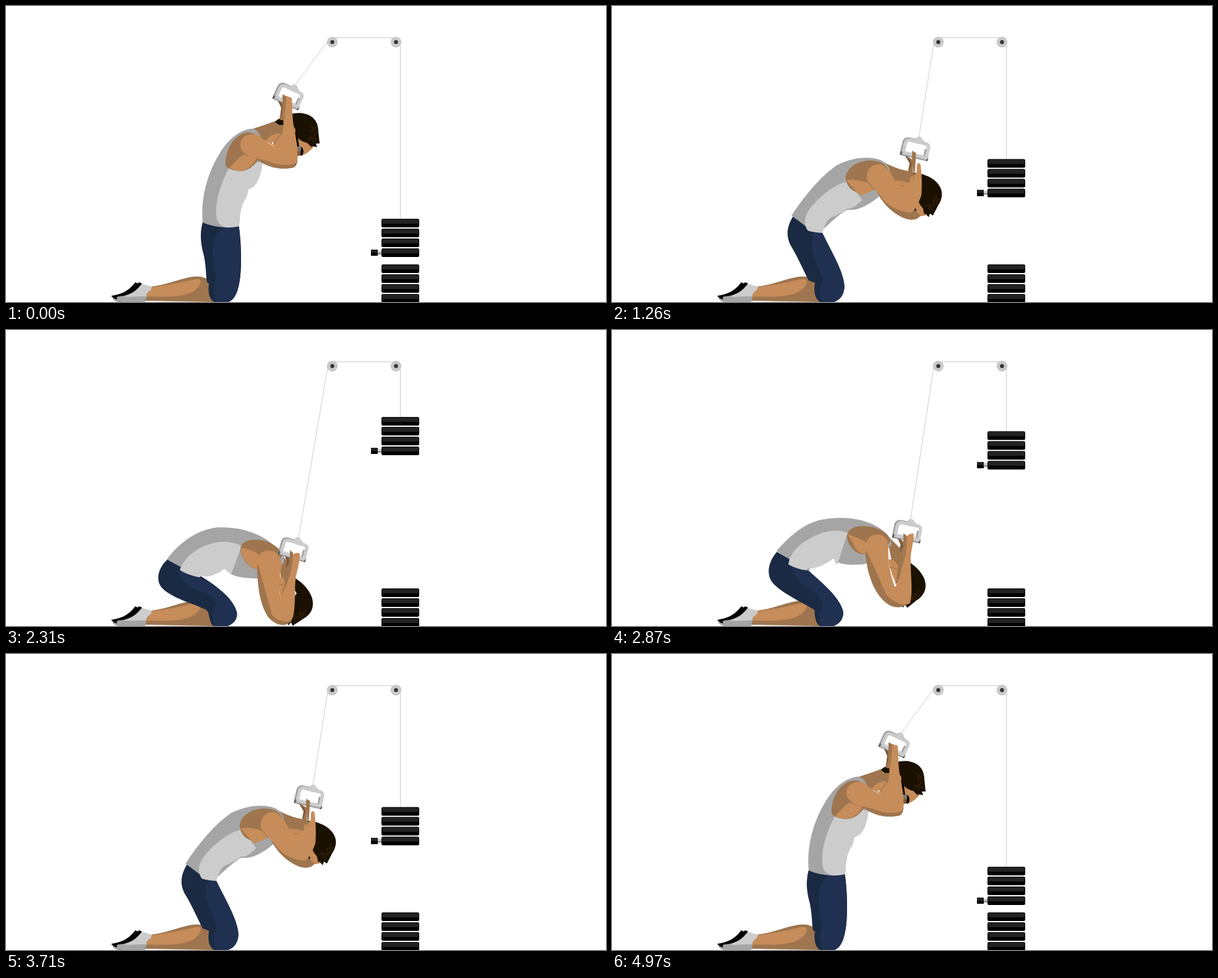
Recreate the animation shown at these times as an HTML page. Size 970 by 480 pixels, loop 5.04 s.

```html
<!DOCTYPE html>
<html lang="en">
<head>
<meta charset="utf-8">
<title>Kneeling cable crunch</title>
<style>
html, body { margin: 0; width: 100%; height: 100%; overflow: hidden; background: #fff; }
svg { display: block; width: 970px; height: 480px; }
.skin { fill: #c68c59; }
.shade { fill: #9e754e; }
.deep { fill: #7d5b3b; }
.grey { fill: #ccc; }
.steel { fill: #a5a5a5; }
.navy { fill: #1a2a42; }
.blue { fill: #203050; }
.hair { fill: #1a1100; }
.line { fill: none; stroke: #ccc; }
.fold { fill: none; stroke: #9e754e; stroke-width: 1.5; }
</style>
</head>
<body>
<svg viewBox="0 0 970 480">
  <defs>
    <g id="plate">
      <rect x="607" width="61" height="14" rx="2.5"/>
      <rect x="607.5" y=".5" width="60" height="7.5" rx="2.5" fill="#222"/>
    </g>
    <g id="stack">
      <use href="#plate"/><use href="#plate" y="16"/><use href="#plate" y="32"/><use href="#plate" y="48"/>
    </g>
    <g id="pulley">
      <circle r="8.7" fill="#c9c9c9"/><circle r="3.2" fill="#333"/>
    </g>
  </defs>

  <path class="line" d="M527 51.5H631Q637.5 51.5 637.5 60"/>
  <path id="rope" class="line"/>
  <path id="cable" class="line"/>
  <use href="#pulley" x="527.5" y="58.5"/>
  <use href="#pulley" x="630.5" y="58.5"/>
  <use href="#stack" y="419"/>
  <g id="load">
    <use href="#stack"/>
    <rect x="601" y="52" width="6" height="6" fill="#999"/>
    <rect x="601" y="52" width="6" height="3" fill="#ccc"/>
    <rect x="590" y="50" width="11" height="10"/>
    <rect x="590" y="50" width="11" height="5" fill="#222"/>
  </g>

  <path class="shade" d="M235 455C260 452 285 441 302 439C315 437 324 441 329 446L335 480L224 478Z"/>
  <path class="skin" d="M235 456C260 454 290 446 307 443C318 441 316 450 310 457C298 470 275 473 224 471Z"/>
  <path class="steel" d="M172 474C185 470 210 462 228 466L225 480H181Q174 478 172 474Z"/>
  <path class="grey" d="M217 450L236 455L234 461L228 465L226 471C212 470 205 473 191 471C203 466 212 458 217 450Z"/>
  <path d="M170 470C185 468 198 463 209 448L213 450L215 448L220 450C211 462 200 470 182 471Q177 472 180 476L174 474Z"/>

  <path id="pants" class="navy"/>
  <path id="thigh" class="blue"/>
  <g id="head">
    <path class="skin" d="M468 200L498 222L497 229C492 235 485 240 478 243H468Z"/>
    <path d="M465 190L472 214L474 229L477 228C482 232 482 239 478 243L476 241L471 243L469 220Z"/>
    <path fill="#777" d="M471 228H477V236H471Z"/>
    <path class="deep" d="M472 235L477 234L476 241L472 242Z"/>
    <path class="hair" d="M434 188C447 178 464 172 480 174C497 177 505 188 505 204L507 223L501 223L503 229L494 227L495 230L487 222C479 220 474 217 471 212L464 193H441Z"/>
    <path fill="none" stroke="#3a2008" stroke-width="1.5" d="M493 192L497 198L494 203L500 208L496 214L503 217M502 194L499 201L504 206M488 218L493 212L496 220"/>
    <ellipse class="skin" cx="462" cy="202" rx="6" ry="7"/>
  </g>
  <path id="neck" class="shade"/>
  <path id="shirt" class="steel"/>
  <path id="front" class="grey"/>
  <path id="armhole" class="shade"/>
  <path id="side" class="skin"/>
  <path id="collar" class="skin"/>
  <path id="crease" class="fold"/>
  <path id="glint" fill="#fff"/>
  <path id="farArm" class="shade"/>
  <path id="farEdge" class="deep"/>
  <g id="handle">
    <path fill="none" stroke="#999" stroke-width="6" d="M-20.5 10L-20.5 -7Q-20 -13 -13 -13H10"/>
    <path fill="#555" d="M-23 9H23V15H-23Z"/>
    <rect x="-20.5" y="8" width="41" height="6.5" fill="#aaa"/>
    <path fill="none" stroke="#999" stroke-width="7" d="M18 -4V9"/>
    <path fill="none" stroke="#ccc" stroke-width="5.5" stroke-linejoin="round" d="M-18.5 9V-6Q-18 -12 -12 -12H13Q19.5 -12 19.5 -6V10H-18.5"/>
    <circle class="grey" cx="2" cy="-15" r="6"/>
  </g>
  <path id="elbow" class="shade"/>
  <path id="arm" class="skin"/>
  <path id="wrist" class="shade"/>
</svg>

<script>
const STEP = 70, COUNT = 72;
const KNOTS = [0, 10, 25, 33];

// Each part: attribute, then its value in the four key poses, upright to lowest.
const parts = {
  load: ["transform", "translate(0 345)", "translate(0 296)", "translate(0 201)", "translate(0 141)"],
  rope: ["d", "M637.5 58L637.5 346", "M637.5 58L637.5 297", "M637.5 58L637.5 202", "M637.5 58L637.5 142"],
  cable: ["d", "M520 57L466 130", "M520 61L487 174", "M520 61L492 269", "M520 61L472 342"],
  handle: ["transform",
    "translate(457.5 146) rotate(25)", "translate(478.5 186.5) rotate(22)",
    "translate(490 283) rotate(9)", "translate(465.5 356) rotate(16)"],
  head: ["transform",
    "translate(502 229) rotate(0) translate(-502 -229)", "translate(521 282) rotate(16) translate(-502 -229)",
    "translate(490 403) rotate(48) translate(-502 -229)", "translate(456 478) rotate(62) translate(-502 -229)"],
  pants: ["d",
    "M318 350C312 372 316 390 320 405C324 425 323 440 325 448L328 450C326 465 329 475 336 480L358 480C372 478 380 455 380 410C380 385 378 368 376 353Z",
    "M308 345C299 362 300 375 308 392C317 412 318 430 321 447L328 450C326 465 329 475 336 480L358 480C372 478 379 460 377 440C376 415 367 385 361 361Z",
    "M277 347C264 366 262 386 274 401C285 415 305 435 318 446L328 450C326 465 329 475 336 480L358 480C371 476 376 464 374 453C369 430 340 400 321 374Z",
    "M261 372C244 388 242 408 253 419C270 436 305 444 324 454L327 458C329 468 331 478 336 480L358 480C370 476 375 466 373 457C366 432 335 412 313 398Z"],
  thigh: ["d",
    "M354 356C337 365 333 385 334 405C335 425 342 440 337 452C333 462 338 472 341 480L358 480C372 478 380 455 380 410C380 385 378 368 376 353Z",
    "M343 361C328 370 326 390 329 410C333 430 343 440 339 450C334 460 337 472 340 480L358 480C372 478 379 460 377 440C376 415 367 385 361 361Z",
    "M307 374C308 392 315 405 325 415C333 424 343 440 339 450C333 459 336 472 339 480L358 480C371 476 376 464 374 453C369 430 340 400 321 374Z",
    "M278 389C284 408 295 418 312 423C325 427 344 436 339 448C333 457 334 472 338 480L358 480C370 476 375 466 373 457C366 432 335 412 313 398Z"],
  neck: ["d",
    "M395 200C410 196 425 190 434 187L440 193L449 193L462 215L442 232L411 214Z",
    "M420 222C435 222 450 221 466 221L470 227L476 228L482 248L465 264L437 236Z",
    "M446 293C458 305 468 313 480 319L490 324L497 330L494 355L473 374L453 320Z",
    "M440 360C448 368 456 374 462 384L466 395L467 404L462 420L444 433L444 384Z"],
  shirt: ["d",
    "M318 351C314 310 327 268 346 238C361 213 383 198 400 199C408 203 411 209 412 214L415 252C412 275 406 293 394 296C389 298 392 304 388 311C380 322 378 335 377 357C360 361 335 359 318 351Z",
    "M305 345C315 308 342 268 372 238C390 222 410 219 425 222C432 225 437 231 437 237L432 276C420 295 408 313 394 313C389 314 388 318 384 323C372 332 368 345 362 364C345 364 322 358 305 345Z",
    "M276 345C300 318 325 293 350 285C385 274 420 276 438 288C446 293 453 300 453 309L434 340C412 352 390 356 376 354C371 353 370 350 367 349C352 360 338 367 327 367C324 369 324 373 322 377C302 375 290 363 276 345Z",
    "M260 372C280 345 310 322 345 320C385 319 418 333 440 355C448 362 451 370 449 378L414 403C395 403 375 402 364 396C359 393 357 389 353 387C340 397 327 401 318 399C316 399 314 399 313 401C295 399 277 390 260 372Z"],
  front: ["d",
    "M362 260C348 285 338 315 340 338C340 350 346 356 355 359C363 360 371 358 377 357C378 335 380 322 388 311C392 304 389 298 394 296C406 293 412 275 415 252Z",
    "M378 274C355 290 336 318 330 337C327 350 331 358 340 363C347 364 354 364 362 364C368 345 372 332 384 323C388 318 389 314 394 313C408 313 420 295 432 276Z",
    "M381 304C360 301 335 312 314 331C300 343 294 356 296 370C304 374 312 376 322 377C324 373 324 369 327 367C338 367 352 360 367 349C370 350 371 353 376 354C390 356 412 352 434 340Z",
    "M381 350C365 342 345 341 324 349C305 356 288 370 281 389C290 395 302 399 313 401C314 399 316 399 318 399C327 401 340 397 353 387C357 389 359 393 364 396C375 402 395 403 414 403Z"],
  armhole: ["d",
    "M355 259C354 240 362 215 385 206C398 203 405 208 408 213L410 246C400 262 388 270 372 267C365 266 358 263 355 259Z",
    "M372 266C370 250 385 230 405 224C420 221 430 226 434 235L430 262C418 276 405 284 390 282C381 281 374 275 372 266Z",
    "M380 306C380 293 395 284 418 286C437 288 449 295 452 308L438 330C430 332 415 332 402 332C390 330 381 318 380 306Z",
    "M381 348C389 339 405 338 422 343C438 350 446 358 446 366L430 390C420 392 410 390 402 387C388 382 374 362 381 348Z"],
  side: ["d",
    "M361 263C367 255 375 248 383 241L405 247C398 262 385 269 372 267C367 266 364 265 361 263Z",
    "M374 272C382 265 395 261 405 261L423 270C412 279 402 283 390 282C383 281 377 277 374 272Z",
    "M380 304C388 306 405 311 415 318L418 332C412 333 405 332 400 331C388 328 380 318 380 304Z",
    "M380 353C390 355 400 358 408 363L407 388C395 386 378 372 380 353Z"],
  collar: ["d",
    "M420 218C428 208 438 204 447 208L442 230C434 228 426 223 420 218Z",
    "M445 246C455 240 465 241 474 238L470 255L464 264C458 258 450 253 445 246Z".replace("L470 255", ""),
    "M453 331C463 329 470 335 476 342L473 372C465 360 457 345 453 331Z",
    "M441 401C448 398 450 404 451 410L444 432C441 420 440 410 441 401Z"],
  crease: ["d",
    "M434 223C437 217 440 212 446 207", "M453 251C458 248 464 245 470 242",
    "M456 343C463 341 469 344 475 348", "M442 413C445 413 447 414 450 411"],
  glint: ["d",
    "M430 221L432 221L432 224L430 224Z", "M453 250L453 250L453 250L453 250Z",
    "M460 345L460 345L460 345L460 345Z", "M446 412L446 412L446 412L446 412Z"],
  farArm: ["d",
    "M439 152L450 156L449 186L442 184L445 165Z", "M462 194L475 199L475 226L466 222L469 207Z",
    "M472 294L485 303L484 324L476 318L479 306Z", "M450 364L461 370L463 395L449 387L454 375Z"],
  farEdge: ["d",
    "M439 152L445 155L448 166L444 182L445 165Z", "M462 194L469 198L472 208L468 221L469 207Z",
    "M472 294L480 300L483 309L478 319L479 306Z", "M450 364L457 369L458 379L452 387L454 375Z"],
  elbow: ["d",
    "M400 244C418 262 445 267 465 262C470 260 472 252 471 246L440 238Z",
    "M428 270C443 292 465 300 480 298C487 296 490 292 490 286L465 272Z",
    "M417 330C423 360 440 385 460 398C472 406 485 405 492 399C495 396 496 393 496 390L450 350Z",
    "M406 380C406 420 412 450 425 467C438 480 450 481 458 475C462 472 464 468 466 460L430 420Z"],
  arm: ["d",
    "M380 232C374 215 392 203 407 209C418 218 428 227 441 230C449 205 450 185 447 163L448 144L462 149C463 170 463 185 466 200C470 220 475 245 469 254C455 261 435 257 425 252C410 247 390 248 380 232Z",
    "M403 252C398 235 412 225 427 228C440 236 452 258 464 264C473 245 475 220 473 205L474 186L488 191C488 208 486 222 485 232C490 250 494 272 489 289C476 294 460 288 448 280C435 272 410 270 403 252Z",
    "M414 322C411 303 422 295 434 295C447 297 452 310 452 322C456 345 465 358 473 374C477 360 484 340 486 320L483 288L499 291C499 310 496 320 497 335C497 360 499 385 494 397C480 400 462 391 450 376C436 360 418 345 414 322Z",
    "M407 378C405 363 415 357 428 358C440 359 446 370 445 385C442 405 440 420 444 433C455 410 460 385 461 375L459 358L475 362C475 380 470 390 468 405C466 430 469 455 462 470C455 475 440 473 430 462C417 445 408 410 407 378Z"],
  wrist: ["d",
    "M447 143L453 147C452 165 451 180 449 190C450 180 449 165 447 160Z",
    "M473 186L479 189C478 205 476 220 474 232C474 220 473 205 473 200Z",
    "M483 287L489 291C489 310 488 325 484 340C486 325 485 310 483 300Z",
    "M459 357L464 361C463 380 462 395 452 415C458 400 461 385 459 372Z"]
};

const NUM = /-?[\d.]+/g;
const tracks = Object.entries(parts).map(([id, [attr, ...poses]]) => ({
  el: document.getElementById(id), attr,
  text: poses[0].split(NUM),
  keys: poses.map(p => p.match(NUM).map(Number))
}));

// Lagrange weights give one smooth curve through all key poses.
const weights = u => KNOTS.map((a, i) =>
  KNOTS.reduce((w, b, j) => i === j ? w : w * (u - b) / (a - b), 1));

function draw(ms) {
  const i = Math.floor(ms / STEP) % COUNT;
  let u = Math.min(i, COUNT - 1 - i);
  if (u > 33) u = 33 + (u - 33) * 0.75;
  const w = weights(u);
  for (const { el, attr, text, keys } of tracks) {
    const value = text.reduce((out, part, n) =>
      out + keys.reduce((sum, k, p) => sum + k[n - 1] * w[p], 0).toFixed(2) + part);
    el.setAttribute(attr, value);
  }
}

const start = performance.now();
function tick() {
  draw(performance.now() - start);
  requestAnimationFrame(tick);
}
tick();
</script>
</body>
</html>
```
